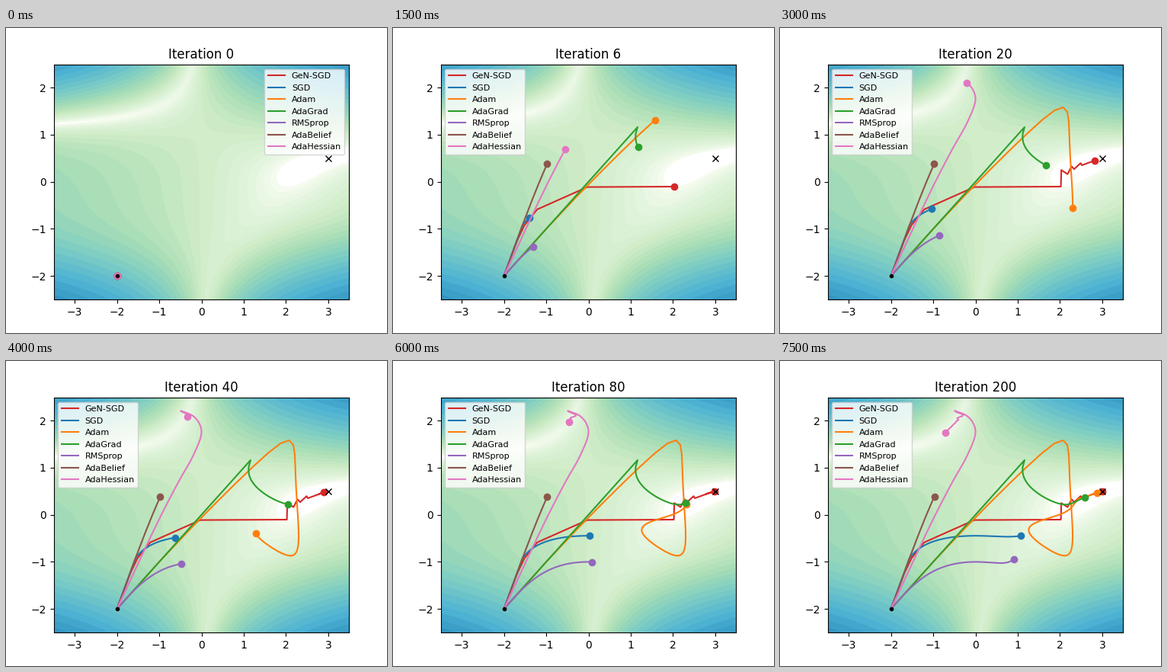
Recreate the animation shown at these times as a matplotlib script. Size 500x400 px, loop 8000 ms.

```python
import numpy as np
import matplotlib.pyplot as plt
from matplotlib.animation import FuncAnimation
from matplotlib.colors import LogNorm

STEPS = 200
START = np.array([-2.0, -2.0])
SHOWN = [0, 2, 4, 6, 8, *range(10, 101, 10), STEPS]


def residuals(x, y):
    return 1.5 - x + x * y, 2.25 - x + x * y**2, 2.625 - x + x * y**3


def beale(x, y):
    return sum(r**2 for r in residuals(x, y))


def grad(p):
    x, y = p
    a, b, c = residuals(x, y)
    return 2 * np.array([
        a * (y - 1) + b * (y**2 - 1) + c * (y**3 - 1),
        a * x + 2 * b * x * y + 3 * c * x * y**2,
    ])


def run(rule):
    """Repeat p -= rule(p, t, state) from START."""
    path, state = [START], {"m": np.zeros(2), "v": np.zeros(2)}
    for t in range(1, STEPS + 1):
        path.append(path[-1] - rule(path[-1], t, state))
    return np.array(path)


def gen_sgd(p, t, s, h=1e-4):
    # Newton step size along the gradient direction
    g = grad(p)
    d = g / (np.linalg.norm(g) + 1e-12)
    curvature = d @ (grad(p + h * d) - grad(p - h * d)) / (2 * h)
    return g / (abs(curvature) + 1e-12)


def sgd(p, t, s, lr=1e-3):
    return lr * grad(p)


def adam(p, t, s, lr=1.0, b1=0.9, b2=0.999):
    g = grad(p)
    s["m"] = b1 * s["m"] + (1 - b1) * g
    s["v"] = b2 * s["v"] + (1 - b2) * g**2
    m, v = s["m"] / (1 - b1**t), s["v"] / (1 - b2**t)
    return lr * m / (np.sqrt(v) + 1e-8)


def adagrad(p, t, s, lr=10**0.5):
    g = grad(p)
    s["v"] = s["v"] + g**2
    return lr * g / (np.sqrt(s["v"]) + 1e-10)


def rmsprop(p, t, s, lr=10**-1.5, alpha=0.99):
    g = grad(p)
    s["v"] = alpha * s["v"] + (1 - alpha) * g**2
    return lr * g / (np.sqrt(s["v"]) + 1e-8)


def adabelief(p, t, s, lr=1e-3, b1=0.9, b2=0.999):
    g = grad(p)
    s["m"] = b1 * s["m"] + (1 - b1) * g
    s["v"] = b2 * s["v"] + (1 - b2) * (g - s["m"])**2
    m = s["m"] / (1 - b1**t)
    # rectified: plain momentum until the variance estimate is usable
    top = 2 / (1 - b2) - 1
    n = top - 2 * t * b2**t / (1 - b2**t)
    if n < 5:
        return lr * m
    rect = (n - 4) / (top - 4) * (n - 2) / n * top / (top - 2)
    return lr * np.sqrt((1 - b2**t) * rect) * m / (np.sqrt(s["v"]) + 1e-16)


def hermite(u, k, c):
    """Smooth curve through the values c at the knots k."""
    d = np.gradient(c, k)
    i = np.clip(np.searchsorted(k, u, side="right") - 1, 0, len(k) - 2)
    h = k[i + 1] - k[i]
    w = (u - k[i]) / h
    return ((1 + 2 * w) * (1 - w)**2 * c[i] + w * (1 - w)**2 * h * d[i]
            + w**2 * (3 - 2 * w) * c[i + 1] + w**2 * (w - 1) * h * d[i + 1])


def adahessian():
    """A climb over the ridge, then a damped swing while sliding down the valley."""
    steps = np.array([0, 4, 6, 10, 15, 20, 24])
    xs = np.array([-2, -0.82, -0.55, -0.19, 0, -0.2, -0.49])
    ys = np.array([-2, 0.23, 0.69, 1.27, 1.79, 2.1, 2.21])
    t = np.arange(STEPS + 1)
    climb, slide = t[t <= 24], t[t > 24]
    u, k = np.sqrt(climb), np.sqrt(steps)
    left, s = STEPS - slide, slide - 24
    x = -0.71 + 0.00208 * left - 0.15 * np.exp(-s / 18) * np.cos(np.pi * s / 13)
    y = 1.75 + 0.00183 * left + 0.14 * np.exp(-s / 15)
    return np.column_stack([np.append(hermite(u, k, xs), x),
                            np.append(hermite(u, k, ys), y)])


RUNS = [
    ("GeN-SGD", "tab:red", run(gen_sgd)),
    ("SGD", "tab:blue", run(sgd)),
    ("Adam", "tab:orange", run(adam)),
    ("AdaGrad", "tab:green", run(adagrad)),
    ("RMSprop", "tab:purple", run(rmsprop)),
    ("AdaBelief", "tab:brown", run(adabelief)),
    ("AdaHessian", "tab:pink", adahessian()),
]

fig, ax = plt.subplots(figsize=(5, 4), dpi=100)
X, Y = np.meshgrid(-3.5 + 0.01 * np.arange(700), -2.5 + 0.01 * np.arange(500))
ax.contourf(X, Y, beale(X, Y) + 1e-12, levels=np.logspace(0, 5, 35),
            norm=LogNorm(), cmap="GnBu")

artists = []
for name, color, path in RUNS:
    line, = ax.plot([], [], color=color, label=name)
    dot, = ax.plot([], [], "o", color=color)
    artists.append((line, dot, path))
ax.plot(*START, "k.", zorder=3)
ax.plot(3, 0.5, "kx", zorder=3)

ax.set_xlim(X.min(), X.max())
ax.set_ylim(Y.min(), Y.max())
title = ax.set_title("Iteration 0")
legend = ax.legend(loc="upper right", fontsize=8)


def update(frame):
    n = SHOWN[frame]
    for line, dot, path in artists:
        line.set_data(*path[:n + 1].T)
        dot.set_data(*path[n:n + 1].T)
    title.set_text(f"Iteration {n}")
    legend.set_loc("upper right" if n < 6 else "upper left")


anim = FuncAnimation(fig, update, frames=len(SHOWN), init_func=lambda: update(0),
                     interval=500, repeat=True, repeat_delay=0)
plt.show()
```
